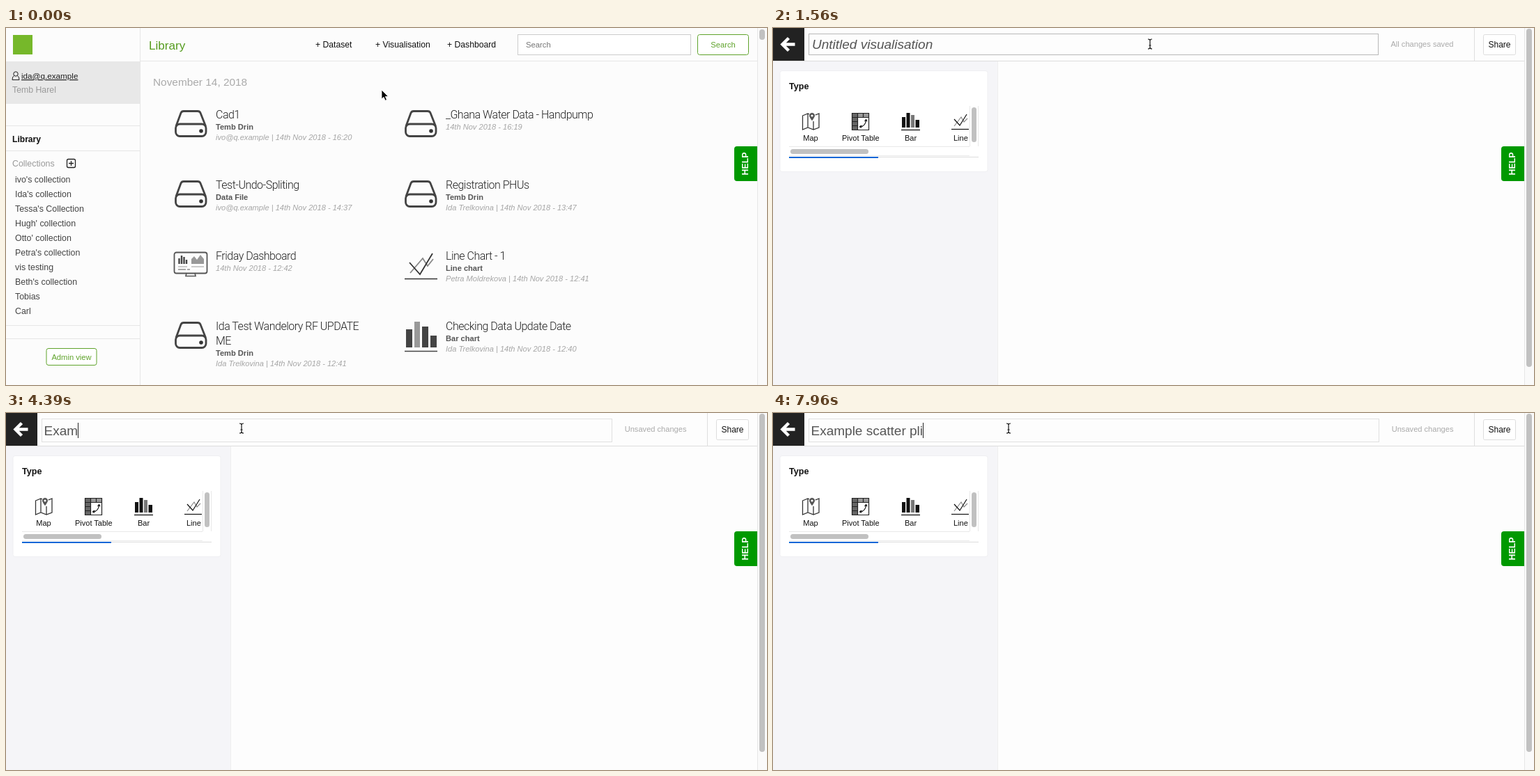
Animation of 1092x513 px, one loop 8 s. Source, as an HTML page:

```html
<!DOCTYPE html>
<html lang="en">
<head>
<meta charset="utf-8">
<title>Naming a visualisation</title>
<style>
  html, body { margin: 0; width: 100%; height: 100%; overflow: hidden; background: #fdfdfd; }
  svg { display: block; width: 100vw; height: 100vh; font-family: "Liberation Sans", Arial, sans-serif; }
  text { white-space: pre; }
  .title { font: 300 16px Roboto, sans-serif; letter-spacing: -.5px; fill: #222; }
  .bold { font-weight: bold; }
  .date { font-style: italic; fill: #a6a6a6; }
  .mid { text-anchor: middle; }
</style>
</head>
<body>
<svg id="stage" viewBox="0 0 1092 513"></svg>
<script>
const LOOP = 8000;
const GREEN = '#5fa32b';

const text = (x, y, size, fill, content, attrs = '') =>
  `<text x="${x}" y="${y}" font-size="${size}" fill="${fill}" ${attrs}>${content}</text>`;
const rect = (x, y, w, h, fill, attrs = '') =>
  `<rect x="${x}" y="${y}" width="${w}" height="${h}" fill="${fill}" ${attrs}/>`;
const path = (d, stroke, width = 1, attrs = '') =>
  `<path d="${d}" fill="none" stroke="${stroke}" stroke-width="${width}" ${attrs}/>`;
const group = (x, y, content, attrs = '') =>
  `<g transform="translate(${x} ${y})" ${attrs}>${content}</g>`;

const icons = {
  disk: path('M2 23 9 4Q10 1.5 13 1.5H33Q36 1.5 37 4L44.500 23', '#444', 2.8) +
    rect(1.5, 20, 43.5, 17.5, 'none', 'rx="6" stroke="#444" stroke-width="2.8"') +
    '<circle cx="38" cy="30" r="2.8" fill="#333"/>',
  dashboard: rect(-.5, 1.5, 47, 30, 'none', 'rx="3" stroke="#555" stroke-width="1.8"') +
    path('M6.500 18V10M10 18V6M13.500 18V8M17 18V12', '#444', 2.4) +
    '<path d="M24 18V11L28 7 32 12 37 5 42 11V18Z" fill="#999"/>' +
    path('M5 22H18M24 22H42', '#999', 1) + path('M5 26H16M18 26H22', '#555', 1) +
    path('M17 31 16 35.500H30L29 31', '#555', 1.6),
  line: path('M8 31 26 10 33 21 41 11', '#888', 1.8) +
    path('M7 16 22 33 40 3', '#333', 1.8) + path('M0 39.500H47', '#333', 1.6),
  bar: rect(2, 11, 9, 26, '#444') + rect(14, 0, 8, 37, '#999') +
    rect(25, 7, 9, 30, '#444') + rect(37, 20, 9, 17, '#444') + path('M0 42.500H47', '#444', 1.6)
};

function card(x, y, icon, title, kind, date) {
  const lines = title.split('|');
  const end = y + 21 * (lines.length - 1);
  return group(x - 59, y - 12, icons[icon]) +
    lines.map((line, i) => text(x, y + 21 * i, 16, '#222', line, 'class="title"')).join('') +
    (kind ? text(x, end + 16, 11.1, '#555', kind, 'class="bold"') : '') +
    text(x, end + (kind ? 31 : 16), 11.1, '#a6a6a6', date, 'class="date"');
}

const help = rect(1045, 170, 38, 50, '#009900', 'rx="4"') +
  rect(1078, 0, 14, 513, '#fafafa') + path('M1078.5 0V513', '#e6e6e6') +
  text(0, 4.5, 12.3, '#fff', 'HELP', 'class="mid bold" transform="translate(1060 195) rotate(-90)"');
const scrollThumb = (y, h) => rect(1081, y, 8, h, '#c1c1c1', 'rx="4"');

const collections = ["ivo's collection", "Ida's collection", "Tessa's Collection", "Hugh' collection",
  "Otto' collection", "Petra's collection", 'vis testing', "Beth's collection", 'Tobias', 'Carl'];

const library = rect(0, 0, 1092, 513, '#fcfcfc') +
  rect(10, 10, 28, 28, '#76b82a') +
  rect(0, 48, 192, 61, '#e8e8e8') +
  path('M0 140.5H192M0 176.5H192M0 427.5H192M0 446.5H192M192.5 0V513M192 47.500H1078', '#e6e6e6') +
  '<circle cx="14" cy="66" r="3.2" fill="none" stroke="#222"/>' +
  path('M11.500 68.500Q9 70 9 74.500H19Q19 70 16.500 68.500', '#222') +
  text(22, 73, 11.7, '#222', 'ida@q.example', 'text-decoration="underline"') +
  text(9, 93, 12.3, '#999', 'Temb Harel') +
  text(9, 163.5, 12.1, '#111', 'Library', 'class="bold"') +
  text(9, 199, 12.4, '#999', 'Collections') +
  rect(87.5, 188.5, 12, 12, 'none', 'rx="2" stroke="#222" stroke-width="1.3"') +
  path('M90 194.500H97M93.500 191V198', '#222', 1.3) +
  collections.map((name, i) => text(13, 222 + 21 * i, 12.4, '#444', name)).join('') +
  rect(58, 460.5, 72, 24, '#fff', `rx="3" stroke="${GREEN}"`) +
  text(94, 476.5, 11.2, GREEN, 'Admin view', 'class="mid"') +
  text(205, 30.5, 17.1, '#559c1f', 'Library') +
  text(444, 28, 12.2, '#111', '+ Dataset') +
  text(530, 28, 12.2, '#111', '+ Visualisation', 'id="addVisual"') +
  text(633, 28, 12.2, '#111', '+ Dashboard') +
  rect(734.5, 9.5, 248, 29, '#fff', 'stroke="#ccc"') +
  text(746, 28, 11.3, '#777', 'Search') +
  rect(992.5, 9.5, 73, 29, '#fff', `rx="3" stroke="${GREEN}"`) +
  text(1029, 28, 11.2, GREEN, 'Search', 'class="mid"') +
  text(211, 83, 15.4, '#aaa', 'November 14, 2018') +
  card(301, 130, 'disk', 'Cad1', 'Temb Drin', 'ivo@q.example | 14th Nov 2018 - 16:20') +
  card(631, 130, 'disk', '_Ghana Water Data - Handpump', '', '14th Nov 2018 - 16:19') +
  card(301, 231, 'disk', 'Test-Undo-Spliting', 'Data File', 'ivo@q.example | 14th Nov 2018 - 14:37') +
  card(631, 231, 'disk', 'Registration PHUs', 'Temb Drin', 'Ida Trelkovina | 14th Nov 2018 - 13:47') +
  card(301, 333, 'dashboard', 'Friday Dashboard', '', '14th Nov 2018 - 12:42') +
  card(631, 333, 'line', 'Line Chart - 1', 'Line chart', 'Petra Moldrekova | 14th Nov 2018 - 12:41') +
  card(301, 434, 'disk', 'Ida Test Wandelory RF UPDATE|ME', 'Temb Drin', 'Ida Trelkovina | 14th Nov 2018 - 12:41') +
  card(631, 434, 'bar', 'Checking Data Update Date', 'Bar chart', 'Ida Trelkovina | 14th Nov 2018 - 12:40') +
  help + scrollThumb(2, 15);

const typeIcons =
  path('M42.500 126 50 123 58 126 66 123V143L58 146 50 143 42.500 146ZM50 123V143M58 134V146', '#333', 1.3) +
  '<path d="M56 134Q51.500 128 51.500 126A4.500 4.500 0 0 1 60.500 126Q60.500 128 56 134Z" fill="#555" stroke="#fff"/>' +
  '<circle cx="56" cy="126" r="1.6" fill="#fff"/>' +
  rect(113.5, 122.5, 24, 24, '#fff') + rect(113.5, 122.5, 24, 6, '#999') + rect(113.5, 122.5, 8, 24, '#666') +
  path('M113.500 122.500H137.500V146.500H113.500ZM113.500 128.500H137.500M121.500 122.500V146.500M129.500 122.500V128.500M113.500 134.500H121.500M113.500 140.500H121.500', '#222', 1.2) +
  path('M125 142Q133 141 133.500 132M131.500 134 133.500 131.500 135 134M127 140 124.500 142 127 143.500', '#111', 1.2) +
  rect(185, 128, 5, 15, '#111') + rect(191.5, 122, 5, 21, '#111') +
  rect(198, 125, 5, 18, '#777') + rect(204.5, 132, 5.5, 11, '#111') + path('M184 146.500H211', '#111', 1.3) +
  path('M260 141 270 128 274 135 279 130', '#888', 1.2) + path('M260 131 268 140 278 124', '#111', 1.2) +
  path('M256 145.500H281', '#111', 1.2);

const typeList = typeIcons +
  ['Map', 'Pivot Table', 'Bar', 'Line'].map((name, i) =>
    text(54 + 71.8 * i, 161.5, 11, '#111', name, 'class="mid"')).join('') +
  path('M23 170.500H282M23 183.500H282M282.500 112V170M294.500 112V170', '#e8e8e8') +
  rect(285, 114, 7, 50, '#c1c1c1', 'rx="3.5"') +
  rect(25, 174, 112, 7, '#c1c1c1', 'rx="3.5"') +
  path('M151 185.500H295', '#ddd') + rect(23, 185, 128, 2, '#0a66d6');

const editor = rect(0, 0, 1092, 513, '#fdfdfd') +
  rect(0, 48, 322, 465, '#f5f5f8') + path('M322.5 48V513', '#eee') +
  path('M0 47.500H1078M1006.500 0V47', '#dedede') +
  rect(0, 0, 45, 47, '#222') +
  path('M31.500 23.500H15M22.500 14.500 13.500 23.500 22.500 32.500', '#fff', 4.4) +
  rect(10, 61.5, 298, 85, '#fff', 'id="panel" rx="3" stroke="#efeff2"') +
  text(23, 88, 12.6, '#111', 'Type', 'class="bold"') +
  rect(22.5, 126, 1.5, 1.5, '#3344bb', 'id="placeholder"') +
  `<g id="types">${typeList}</g>` +
  rect(51.5, 8.5, 817, 30, '#fdfdfd', 'id="field"') +
  text(56, 29.5, 19, '#222', 'Untitled visualisation', 'id="untitled" font-style="italic"') +
  text(54.5, 31.5, 19, '#555', '', 'id="typed"') +
  rect(54, 14, 1, 22, '#222', 'id="caret"') +
  text(976.5, 27, 11.1, '#aaa', '', 'id="status" text-anchor="end"') +
  rect(1019.5, 9.5, 46, 29, '#fff', 'rx="2" stroke="#ddd"') +
  text(1042.5, 28, 12, '#111', 'Share', 'class="mid"') +
  help + scrollThumb(1, 486);

const pointers =
  '<path id="arrow" d="M0 0V13L3 10.300 5.200 15.200 7.400 14.200 5.300 9.500H9.500Z" fill="#000" stroke="#fff" stroke-width=".8"/>' +
  '<path id="hand" d="M-1.500 0Q0-2 1 0L2.500 5Q4 4 5 5.500 6.500 5 7 6.500 8.500 6 8.500 8.500L8 12 7 14H1L-3.500 8.500Q-4.500 6.500-2.500 6.500L-.200 8Z" fill="#fff" stroke="#111"/>' +
  '<g id="beam"><path d="M-3-7Q0-7 0-5Q0-7 3-7M0-5V5M-3 7Q0 7 0 5Q0 7 3 7M-1.500 2H1.500" fill="none" stroke="#111" stroke-width="1.2"/></g>' +
  '<circle id="ring" r="10" fill="none" stroke="#222" stroke-width="1.1"/>';

document.getElementById('stage').innerHTML =
  `<g id="library">${library}</g><g id="editor">${editor}</g><g id="pointer">${pointers}</g>`;

const el = id => document.getElementById(id);
const show = (id, visible) => el(id).setAttribute('display', visible ? 'inline' : 'none');
const set = (id, attrs) => Object.entries(attrs).forEach(([key, value]) => el(id).setAttribute(key, value));
const latest = (steps, t) => steps.filter(step => step[0] <= t).pop();

const moves = [
  [0, 539, 89], [150, 556, 61], [300, 557, 33], [480, 557, 23],
  [1260, 556.5, 23], [1560, 541, 23], [1710, 470, 23], [1860, 378, 22], [2000, 338, 22]
];
const PHRASE = 'Example scatter pli';
// Time and number of characters typed so far.
const keys = [
  [0, 0], [3800, 1], [4090, 2], [4240, 3], [4390, 4], [4540, 5], [4840, 7], [4990, 8], [5130, 9],
  [5730, 10], [5880, 11], [6030, 12], [6180, 13], [6920, 14], [7060, 15], [7210, 16],
  [7510, 17], [7810, 18], [7960, 19]
];

function render(t) {
  const inEditor = t >= 1260, editing = t >= 2300;
  const loaded = t >= 1410, hovered = t >= 1560;
  show('library', !inEditor);
  show('editor', inEditor);

  const fade = t < 300 ? 0 : Math.min(1, (Math.floor((t - 300) / 180) + 1) / 3);
  const shade = Math.round(17 + 108 * fade);
  set('addVisual', { fill: `rgb(${shade},${shade},${shade})` });

  set('panel', { height: loaded ? 145 : 85 });
  show('placeholder', !loaded);
  show('types', loaded);

  show('field', hovered);
  set('field', { height: editing ? 33 : 30, width: editing ? 818 : 817, stroke: editing ? '#e0e0e0' : '#b8b8b8' });
  show('untitled', !editing);
  set('untitled', { fill: hovered ? '#555' : '#222' });
  el('status').textContent = editing ? 'Unsaved changes' : 'All changes saved';

  el('typed').textContent = PHRASE.slice(0, latest(keys, t)[1]);
  const blinkedOff = (t >= 2750 && t < 3350) || (t >= 6770 && t < 6920);
  show('caret', editing && !blinkedOff);
  if (editing) set('caret', { x: Math.round(54.3 + el('typed').getComputedTextLength()) });

  const [, x, y] = latest(moves, t);
  set('pointer', { transform: `translate(${x} ${y})` });
  show('arrow', t < 300);
  show('hand', t >= 300 && !inEditor);
  show('beam', inEditor);
  show('ring', (t >= 1110 && t < 1260) || (t >= 2150 && t < 2300));
}

const start = performance.now();
function tick() {
  render((performance.now() - start) % LOOP);
  requestAnimationFrame(tick);
}
tick();
</script>
</body>
</html>
```
